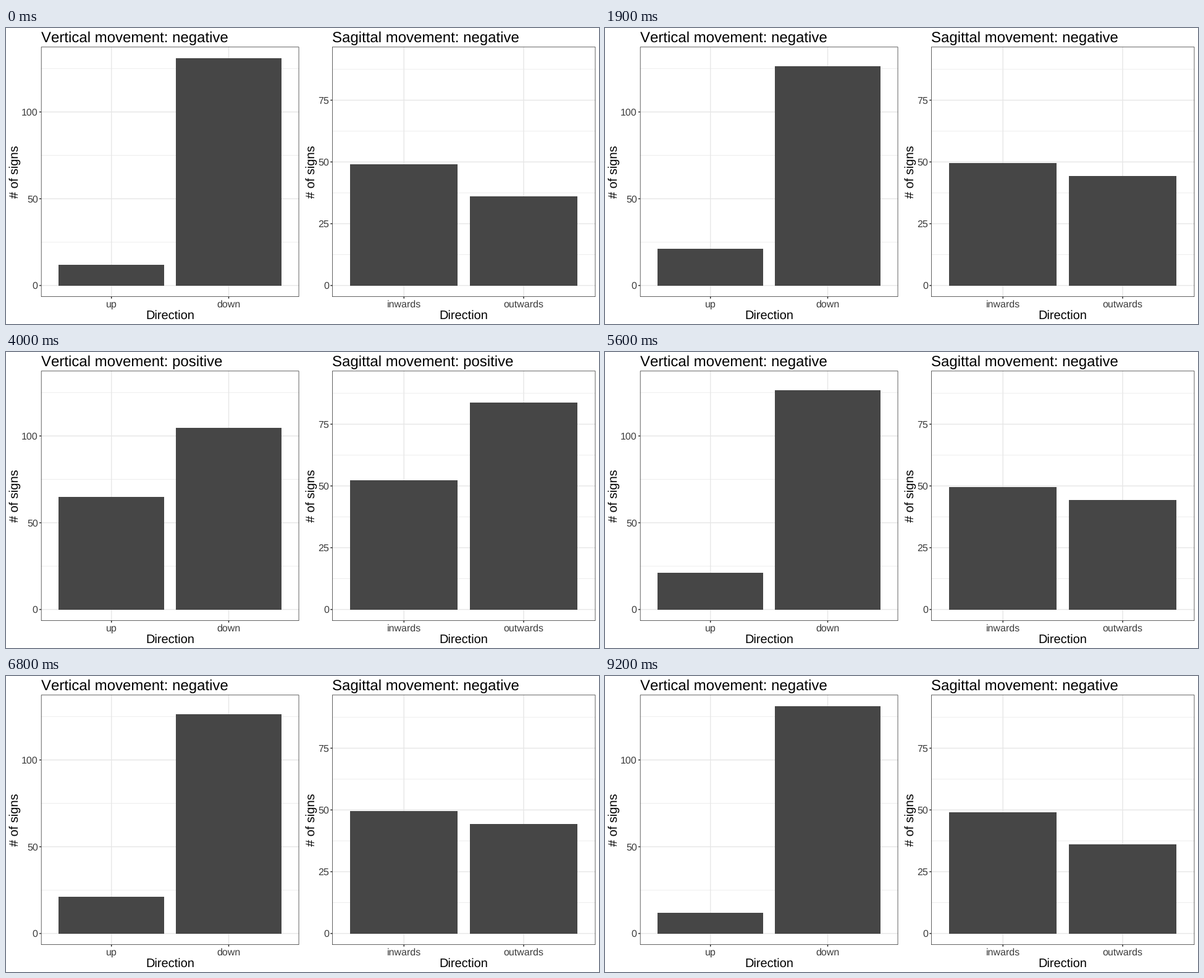
Write a matplotlib script that moves like this. It is 960 px wide and 480 px high and loops after 9900 ms.

```python
import numpy as np
import matplotlib.pyplot as plt
from matplotlib.animation import FuncAnimation
from matplotlib.lines import Line2D
from matplotlib.patches import Rectangle

W, H, DPI = 960, 480, 100
PT = 72 / DPI  # points per pixel
plt.rcParams.update({
    "font.family": "Liberation Sans",
    "text.hinting": "none",
    "text.kerning_factor": 6,
})

BAR, GRID, DARK, LABEL = "#464646", "#e7e7e7", "#232323", "#3b3b3b"
TOP, BOTTOM = 30.5, 436
TICK, LINE = 2.75, 1.42

# Phase 0 is the negative state, phase 4 the positive one.
KEYS = [0, 6, 10, 16, 19, 30, 33, 39, 43, 55, 59, 65, 68, 79, 82, 88, 92, 98]
PHASES = [0, 0, 4, 4, 1, 1, 4, 4, 0, 0, 4, 4, 1, 1, 4, 4, 0, 0]

fig = plt.figure(figsize=(W / DPI, H / DPI), dpi=DPI, facecolor="white")
ax = fig.add_axes([0, 0, 1, 1])
ax.set_xlim(0, W)
ax.set_ylim(H, 0)
ax.axis("off")


def line(x, y, color, width, z):
    ax.add_line(Line2D(x, y, color=color, lw=width * PT, zorder=z,
                       solid_capstyle="butt", snap=False))


def label(x, y, s, size, color="black", ha="center", rotation=0):
    return ax.text(x, y, s, fontsize=size * PT, color=color, ha=ha,
                   va="baseline", rotation=rotation,
                   rotation_mode="anchor", zorder=6)


class Panel:
    def __init__(self, name, left, right, cats, negative, positive,
                 major, minor, ylabel_x):
        self.name = name
        self.negative = np.array(negative)
        self.positive = np.array(positive)
        peak = max(negative + positive)
        self.scale = (BOTTOM - TOP) / (1.1 * peak)
        self.zero = BOTTOM - 0.05 * peak * self.scale
        unit = (right - left) / 2.2

        for v in minor:
            line([left, right], [self.y(v)] * 2, GRID, LINE / 2, 1)
        for v in major:
            y = self.y(v)
            line([left, right], [y, y], GRID, LINE, 2)
            line([left - TICK, left], [y, y], DARK, LINE, 5)
            label(left - 5.1, y + 5.7, str(v), 16, LABEL, "right")

        self.bars = []
        for i, cat in enumerate(cats):
            x = left + (0.6 + i) * unit
            line([x, x], [TOP, BOTTOM], GRID, LINE, 2)
            line([x, x], [BOTTOM, BOTTOM + TICK], DARK, LINE, 5)
            label(x, 453, cat, 16, LABEL)
            x0, x1 = round(x - 0.45 * unit), round(x + 0.45 * unit)
            bar = Rectangle((x0, round(self.zero)), x1 - x0, 0, fc=BAR,
                            ec="none", lw=0, zorder=3)
            self.bars.append(ax.add_patch(bar))

        half = LINE / 2
        ax.add_patch(Rectangle(
            (left + half / 2, TOP + half / 2), right - left - half,
            BOTTOM - TOP - half, fill=False, ec=DARK, lw=half * PT,
            joinstyle="miter", snap=False, zorder=4))

        label((left + right) / 2, 472, "Direction", 20)
        label(ylabel_x, (TOP + BOTTOM) / 2, "# of signs", 20, rotation=90)
        self.title = label(left, 23, "", 24, ha="left")

    def y(self, v):
        return self.zero - v * self.scale

    def show(self, t, state):
        self.title.set_text(f"{self.name} movement: {state}")
        values = self.negative + (self.positive - self.negative) * t
        for bar, v in zip(self.bars, values):
            bar.set_height(round(self.y(v)) - round(self.zero))


panels = [
    Panel("Vertical", 56.8, 474.4, ("up", "down"), (12, 131), (74, 100),
          (0, 50, 100), (25, 75, 125), 20),
    Panel("Sagittal", 528, 954.3, ("inwards", "outwards"), (49, 36), (53, 92),
          (0, 25, 50, 75), (12.5, 37.5, 62.5, 87.5), 500),
]


def update(i):
    before, phase = np.interp([i - 1, i], KEYS, PHASES)
    t = (1 - np.cos(np.pi * phase / 4)) / 2
    # Halfway through, the title already names the state being approached.
    state = "positive" if phase + (phase - before) / 2 > 2 else "negative"
    for panel in panels:
        panel.show(t, state)
    return []


anim = FuncAnimation(fig, update, frames=99, interval=100, repeat=True,
                     repeat_delay=0, init_func=lambda: update(0))
plt.show()
```
